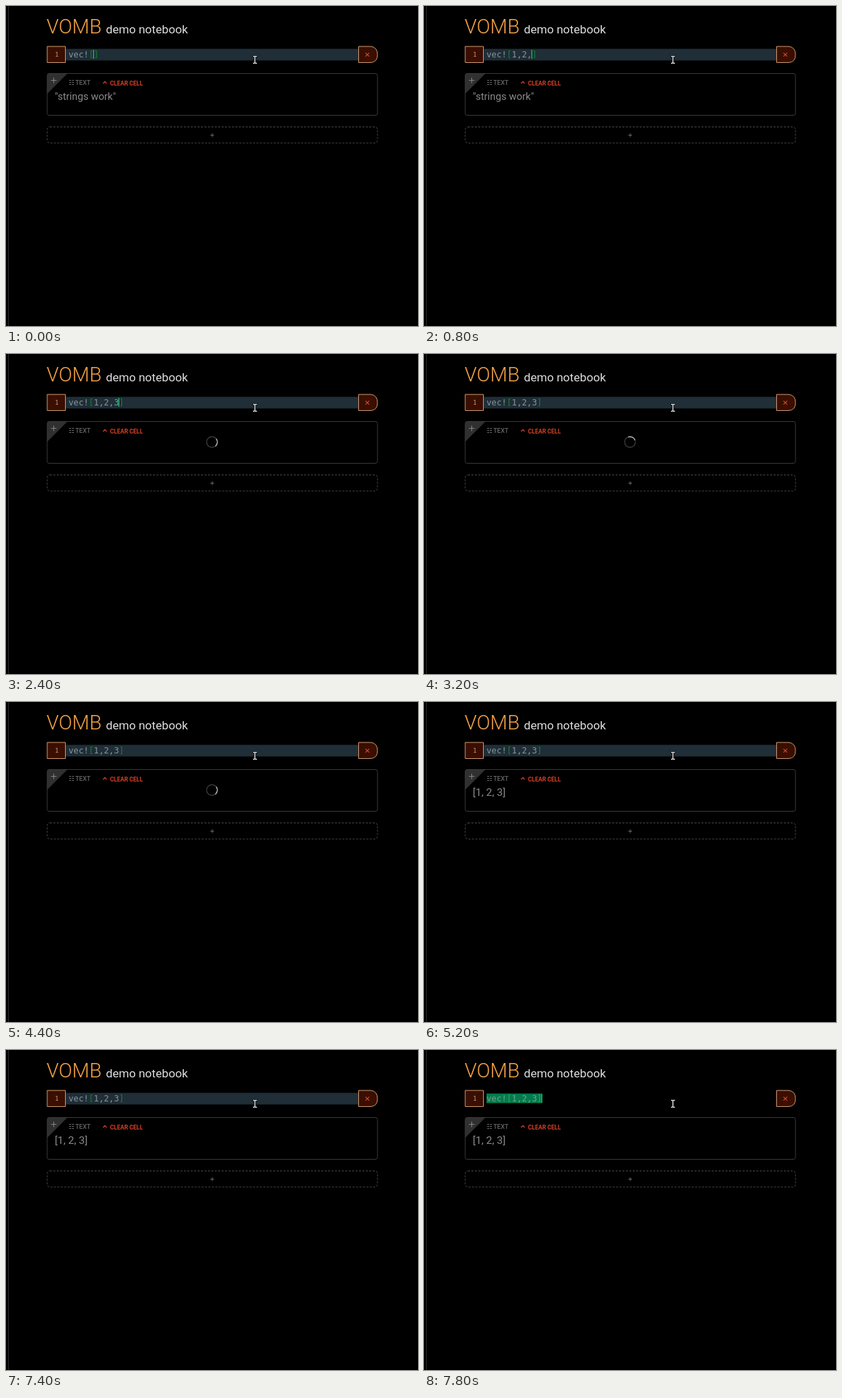
Recreate the animation shown at these times as an HTML page. Size 600 by 467 pixels, loop 8000 ms.

```html
<!DOCTYPE html>
<html lang="en">
<head>
<meta charset="utf-8">
<title>Demo notebook</title>
<style>
  html, body { margin: 0; width: 100%; height: 100%; overflow: hidden; background: #000; }
  svg { display: block; width: 100vw; height: 100vh; }
  text { font-family: Roboto, sans-serif; white-space: pre; }
  .mono { font-family: "DejaVu Sans Mono", monospace; font-size: 12.23px; }
  .out { fill: #8a8a8a; }
  .mid { text-anchor: middle; }
  .match { fill: #12852c; }
</style>
</head>
<body>
<svg viewBox="0 0 600 467" fill="none">
  <rect width="600" height="467" fill="#000"/>
  <path d="M3.5 0V467" stroke="#2b2b2b"/>

  <text x="59" y="40" font-size="29" font-weight="300" fill="#f3a145">VOMB</text>
  <text x="145.5" y="39.5" font-size="17.1" fill="#dedede">demo notebook</text>

  <!-- code cell -->
  <rect id="line" x="87" y="62.5" width="426" height="17" fill="#1f2e37"/>
  <rect id="selection" x="91" y="63.5" width="81" height="14" fill="#007c4e"/>
  <text id="code" class="mono" x="91" y="75"><tspan>vec!</tspan><tspan class="match">[</tspan><tspan id="typed"></tspan><tspan class="match">]</tspan></text>
  <path id="caret" d="M0 64V77" stroke="#0fd07c" stroke-width="1.2"/>
  <g fill="#3a0f02" stroke="#d09a72">
    <path d="M60 59H86.5V82.5H60Z"/>
    <path d="M513.5 59H531Q541 60 541 71T531 82.5H513.5Z"/>
  </g>
  <text class="mono mid" x="74" y="74" style="font-size:9px" fill="#c9926a">1</text>
  <path d="M523.5 68.3l5.4 5.4m0-5.4l-5.4 5.4" stroke="#e8452a" stroke-width="1.1"/>

  <!-- output cell -->
  <path d="M60 99H89L60 128Z" fill="#303030"/>
  <rect x="60" y="98.5" width="481" height="61" rx="3" stroke="#3a3a3a"/>
  <path d="M65.5 108.5h8m-4-4v8" stroke="#858585"/>
  <path d="M92 108.5h7M92 111.5h7M92 114.5h7" stroke="#686868" stroke-dasharray="3 1"/>
  <text x="101" y="114.8" font-size="9.1" font-weight="500" fill="#686868">TEXT</text>
  <path d="M141.5 113l2.5-2.7 2.5 2.7" stroke="#e8452a" stroke-width="1.2"/>
  <text x="151.5" y="116" font-size="8.5" font-weight="700" fill="#dc3f24">CLEAR CELL</text>
  <text id="before" class="out" x="71" y="137" font-size="14.7">"strings work"</text>
  <text id="after" class="out" x="71" y="137" font-size="15.4">[1, 2, 3]</text>
  <g id="spinner" transform="translate(300 128.5)" stroke-width="1.4">
    <circle id="ring" r="7.8" stroke="#393939"/>
    <path id="arc" d="M-5.5-5.5A7.8 7.8 0 0 1 5.5-5.5"/>
  </g>

  <!-- add cell -->
  <rect x="60" y="176.5" width="481" height="23.5" rx="4" stroke="#474747" stroke-dasharray="3 2"/>
  <path d="M297.5 188.5h5.5m-2.75-2.75v5.5" stroke="#666"/>

  <!-- pointer -->
  <g stroke-linecap="square">
    <path d="M360.5 73.5h4M362.5 73.5V83.5M360.5 83.5h4" stroke="#000" stroke-width="3"/>
    <path d="M360.5 73.5h1.2M363.5 73.5h1.2M362.5 74.5V82.5M360.5 83.5h1.2M363.5 83.5h1.2" stroke="#f4f4f4" stroke-width="1.3"/>
  </g>
</svg>
<script>
const LOOP = 8000, STEP = 200, BLINK = 1120;
const RUN = 1600, DONE = 4800, SELECT = 7800;
const INPUT = "1,2,3", CHAR_W = 7.364;
const el = id => document.getElementById(id);
const show = (id, on) => el(id).setAttribute("visibility", on ? "visible" : "hidden");

function render(ms) {
  const t = Math.floor((ms % LOOP) / STEP) * STEP;
  const count = Math.min(INPUT.length, t / STEP);
  const selected = t >= SELECT;
  const running = t >= RUN && t < DONE;

  el("typed").textContent = INPUT.slice(0, count);
  el("code").setAttribute("fill", selected ? "#75a287" : "#899499");
  document.querySelectorAll(".match").forEach(b => b.style.fill = selected ? "#35a956" : "");
  show("line", !selected);
  show("selection", selected);

  const caretOn = t < 1200 || ((t - 1200) / BLINK) % 1 < 0.5;
  show("caret", selected || caretOn);
  el("caret").setAttribute("transform", `translate(${91 + (selected ? 11 : 5 + count) * CHAR_W - 0.3} 0)`);

  show("before", t < RUN);
  show("after", t >= DONE);
  show("spinner", running);
  // The spinner fades in, one turn per second.
  el("ring").setAttribute("stroke-opacity", t < 2000 ? 0.25 : 1);
  el("arc").setAttribute("stroke", t < 2000 ? "#686868" : "#b4b4b4");
  el("arc").setAttribute("transform", `rotate(${25 + (t - 3200) * 0.36})`);
}

const start = performance.now();
function tick() {
  render(performance.now() - start);
  requestAnimationFrame(tick);
}
tick();
</script>
</body>
</html>
```
